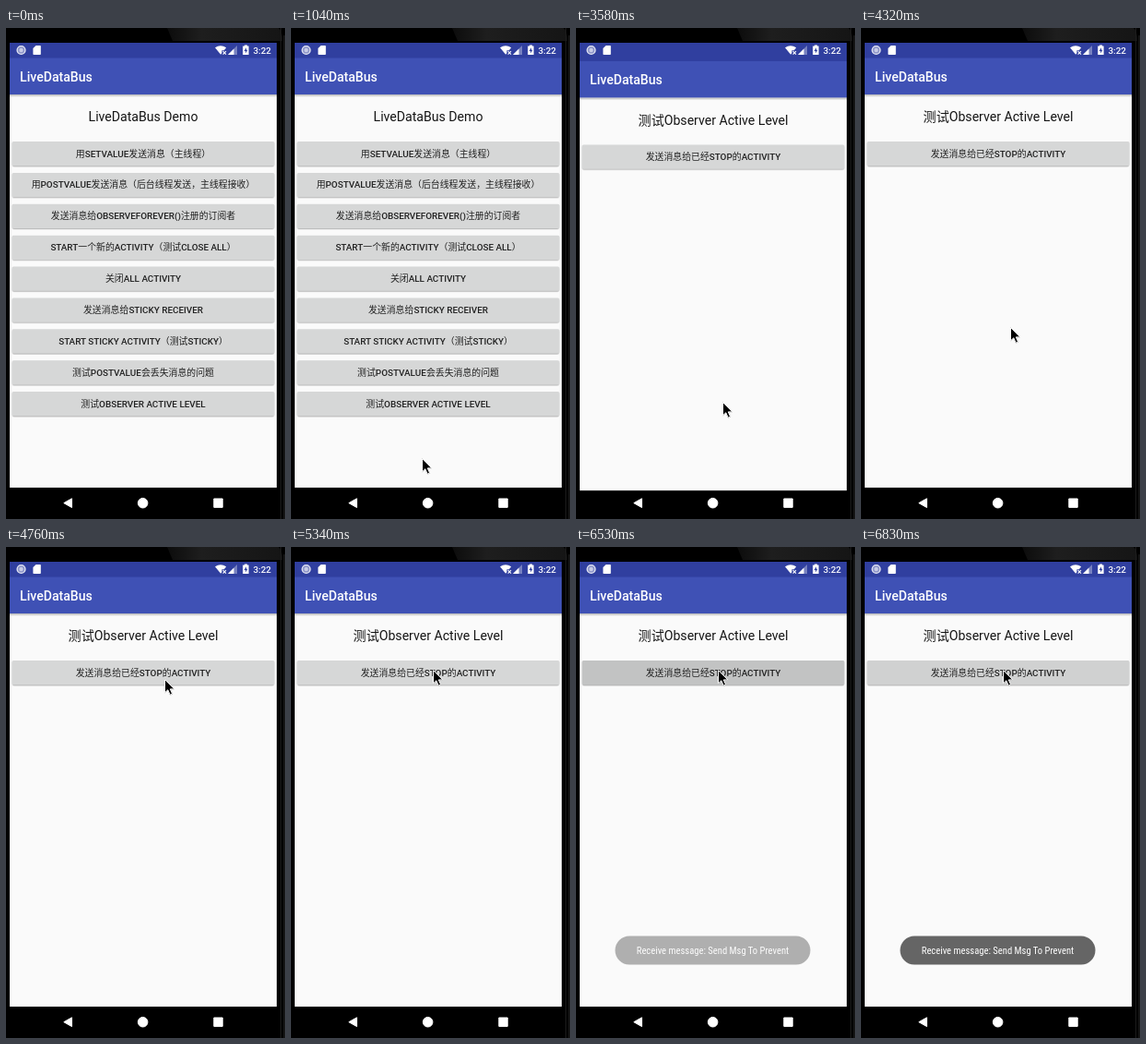
These frames come from a looping animation (303x532 px, 8000 ms). An HTML page:

```html
<!DOCTYPE html>
<html lang="zh-CN">
<head>
<meta charset="utf-8">
<title>LiveDataBus Demo</title>
<style>
html, body { margin: 0; width: 100%; height: 100%; overflow: hidden; background: #000; }
svg { display: block; width: 303px; height: 532px; font-family: Roboto, "Noto Sans CJK SC", "Noto Sans CJK", sans-serif; }
.mid { text-anchor: middle; }
.head { font-size: 14.1px; fill: #151515; }
.bar { font-size: 14.1px; font-weight: 500; fill: #fff; }
.label { font-size: 9.88px; font-weight: 500; fill: #212121; }
.han { font-weight: 400; }
.toast { font-size: 10.6px; fill: #fff; font-family: "Roboto Condensed", Roboto, sans-serif; font-stretch: 75%; }

#home, #detail, #cursor, #touch, #wash, #toast { animation: 8s step-end infinite; }
#home { animation-name: home; }
#detail { animation-name: detail; }
#cursor { animation-name: cursor; }
#touch { animation-name: touch; }
#wash { animation-name: wash; }
#toast { animation-name: toast; }

@keyframes home { 0% { visibility: visible } 44.75%, 100% { visibility: hidden } }
@keyframes detail {
  0% { visibility: hidden; transform: translateY(3.4px) }
  44.75% { visibility: visible; transform: translateY(3.4px) }
  46.5%, 100% { visibility: visible; transform: none }
}
@keyframes cursor {
  0% { transform: translate(131px, 540px) }
  9.375% { transform: translate(131px, 527px) }
  11.25% { transform: translate(139px, 478px) }
  13% { transform: translate(142px, 466px) }
  14.875% { transform: translate(143px, 465px) }
  18.625% { transform: translate(149px, 445px) }
  20.5% { transform: translate(156px, 415px) }
  22.375% { transform: translate(157px, 408px) }
  24.125% { transform: translate(159px, 405px) }
  54% { transform: translate(162px, 324px) }
  55.75% { transform: translate(164px, 247px) }
  57.625% { transform: translate(165px, 235px) }
  59.5% { transform: translate(172px, 143px) }
  61.25% { transform: translate(167px, 136px) }
  63.125% { transform: translate(159px, 134px) }
  64.875% { transform: translate(154px, 133px) }
  66.75%, 100% { transform: translate(154px, 133px) }
}
@keyframes touch { 0% { opacity: 0 } 79.875% { opacity: 1 } 81.625%, 100% { opacity: 0 } }
@keyframes wash { 0% { opacity: 0 } 81.625% { opacity: .09 } 83.5% { opacity: .06 } 85.375%, 100% { opacity: .025 } }
@keyframes toast { 0% { opacity: 0 } 81.625% { opacity: .5 } 83.5% { opacity: .82 } 85.375%, 100% { opacity: 1 } }
</style>
</head>
<body>
<svg viewBox="0 0 303 532">
  <defs>
    <linearGradient id="shade" x2="0" y2="1">
      <stop stop-color="#000" stop-opacity=".28"/>
      <stop offset="1" stop-color="#000" stop-opacity="0"/>
    </linearGradient>
    <linearGradient id="gloss">
      <stop stop-color="#0c0c0c"/>
      <stop offset=".3" stop-color="#1e1e1e"/>
      <stop offset="1" stop-color="#151515"/>
    </linearGradient>
    <radialGradient id="ripple">
      <stop stop-color="#000" stop-opacity=".1"/>
      <stop offset=".8" stop-color="#000" stop-opacity=".08"/>
      <stop offset="1" stop-color="#000" stop-opacity="0"/>
    </radialGradient>
    <clipPath id="first"><rect x="6.5" y="123" width="285" height="26.5" rx="1.5"/></clipPath>
    <g id="frame">
      <rect x="4" y="33" width="290" height="465" fill="#fafafa"/>
      <rect x="4" y="72" width="290" height="3" fill="url(#shade)"/>
      <rect x="4" y="32.5" width="290" height="39.5" fill="#3f51b5"/>
      <text class="bar" x="15" y="58">LiveDataBus</text>
    </g>
  </defs>

  <!-- phone body -->
  <rect width="303" height="532"/>
  <path d="M175 0H296Q300 3 300 14H181Z" fill="url(#gloss)"/>
  <path d="M298.5 0V532" stroke="#1c1c1c"/>
  <path d="M302 8V532" stroke="#262626"/>
  <rect x="4" y="15" width="290" height="1" fill="#000"/>
  <rect x="4" y="16" width="290" height="21" fill="#303f9f"/>

  <g id="home">
    <use href="#frame"/>
    <text class="head mid" x="149" y="101.4">LiveDataBus Demo</text>
  </g>
  <g id="detail">
    <use href="#frame"/>
    <text class="head mid" x="149" y="101.4">测试Observer Active Level</text>
  </g>

  <!-- status bar -->
  <g fill="#fff">
    <circle cx="16.5" cy="24" r="4.4" fill="#8b93c8" stroke="#e4e6f3" stroke-width="1.4"/>
    <circle cx="16.5" cy="24" r="2.2" fill="#c8cce6"/>
    <path d="M32.5 19H37Q37.8 19 37.8 19.8V28.2Q37.8 29 37 29H30.2Q29.4 29 29.4 28.2V22Z"/>
    <path d="M227 21.2Q233 17.4 239.2 21.2L236.8 24.2H234.4V27.2L233.2 28.8Z"/>
    <path d="M235.6 25.2L239 28.6M239 25.2L235.6 28.6" stroke="#fff" stroke-width="1.1"/>
    <path d="M251 19V29H241Z" opacity=".35"/>
    <path d="M247.5 22.5V29H241Z"/>
    <path d="M259 18.6H262V19.6H263.6V29H257.2V19.6H259Z"/>
    <path d="M261 21.2L258.6 25H260.2V27.6L262.4 23.8H261Z" fill="#303f9f"/>
    <text x="268.5" y="27.8" font-size="9.9" font-weight="500">3:22</text>
  </g>

  <!-- navigation -->
  <g fill="#fff" stroke="#fff" stroke-linejoin="round">
    <path d="M62.8 514.7L71.5 509.8V519.6Z"/>
    <circle cx="148.6" cy="514.7" r="5.3"/>
    <rect x="225.8" y="510" width="9.4" height="9.4"/>
  </g>

  <g id="toast">
    <rect x="42.5" y="421.5" width="212" height="31" rx="15.5" fill="#656565"/>
    <text class="toast mid" x="148.5" y="441.2">Receive message: Send Msg To Prevent</text>
  </g>
  <path id="cursor" d="M.5 .6V14.8L3.8 11.8L6.2 17.2L8.6 16.2L6.3 10.9H10.8Z"
    stroke="#fff" stroke-width="1" style="filter: drop-shadow(0 .8px .7px #0006)"/>
</svg>
<script>
const home = document.getElementById('home');
const detail = document.getElementById('detail');

const styled = s => s.replace(/[^\x00-\x7f]+/g, m => `<tspan class="han">${m}</tspan>`);

function button(page, text, row, effects = '') {
  const y = 123 + row * 33.88;
  page.insertAdjacentHTML('beforeend', `
    <rect x="6.5" y="${y + 1}" width="285" height="26.8" rx="2" fill="#000" opacity=".1"/>
    <rect x="7" y="${y + .6}" width="284" height="26.6" rx="2" fill="#000" opacity=".16"/>
    <rect x="6.5" y="${y}" width="285" height="26.3" rx="1.5" fill="#d6d7d7"/>${effects}
    <text class="label mid" x="149" y="${y + 16.6}">${styled(text)}</text>`);
}

[
  '用SETVALUE发送消息（主线程）',
  '用POSTVALUE发送消息（后台线程发送，主线程接收）',
  '发送消息给OBSERVEFOREVER()注册的订阅者',
  'START一个新的ACTIVITY（测试CLOSE ALL）',
  '关闭ALL ACTIVITY',
  '发送消息给STICKY RECEIVER',
  'START STICKY ACTIVITY（测试STICKY）',
  '测试POSTVALUE会丢失消息的问题',
  '测试OBSERVER ACTIVE LEVEL'
].forEach((text, i) => button(home, text, i));

button(detail, '发送消息给已经STOP的ACTIVITY', 0, `
  <g clip-path="url(#first)">
    <circle id="touch" cx="151.5" cy="140" r="33" fill="url(#ripple)"/>
    <rect id="wash" x="6" y="123" width="286" height="27"/>
  </g>`);
</script>
</body>
</html>
```
